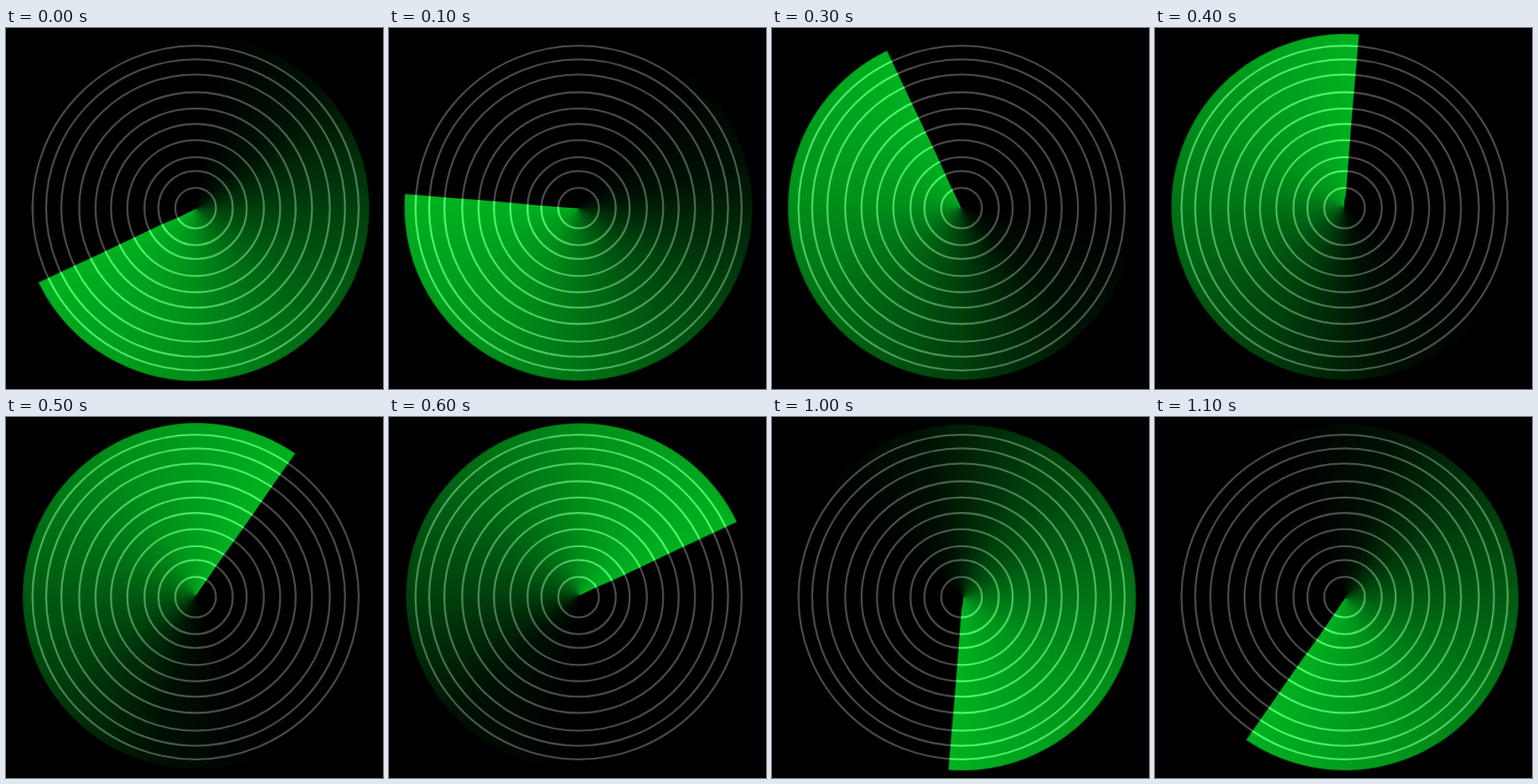
An HTML page that plays this animation: 450x430 px, repeating every 1200 ms.

```html
<!DOCTYPE html>
<html lang="en">
<head>
<meta charset="utf-8">
<title>Radar sweep</title>
<style>
  html, body {
    margin: 0;
    width: 100%;
    height: 100%;
    overflow: hidden;
    background: #000;
  }
  .stage {
    position: relative;
    width: 450px;
    height: 430px;
    overflow: hidden;
    background: #000;
    isolation: isolate;
  }
  /* The dish is slightly wider than tall. */
  .dish {
    position: absolute;
    left: 21.4px;
    top: 8.4px;
    width: 412px;
    height: 412px;
    transform: scale(1.007, 1);
  }
  /* The beam turns a little off its own centre. */
  .beam {
    width: 100%;
    height: 100%;
    border-radius: 50%;
    background: conic-gradient(from .25deg at calc(50% - 1px) 50%,
      #00b120, #000 .3deg, #000 120deg, #001003 160deg,
      #00400c 206deg, #00911a 300deg, #00b120);
    animation: sweep 1.2s steps(12) infinite;
  }
  @keyframes sweep {
    from { transform: rotate(244.4deg) translateY(-1px); }
    to { transform: rotate(604.4deg) translateY(-1px); }
  }
  /* Rings add their light to the beam. */
  svg {
    position: absolute;
    inset: 0;
    mix-blend-mode: plus-lighter;
  }
  circle {
    fill: none;
    stroke: #484848;
    stroke-width: 2.4;
  }
</style>
</head>
<body>
<div class="stage">
  <div class="dish"><div class="beam"></div></div>
  <svg width="450" height="430" viewBox="0 0 450 430">
    <g transform="translate(226.3 214.5) scale(1 .993)">
      <circle r="24.3"/>
      <circle r="44.4"/>
      <circle r="61"/>
      <circle r="81.5"/>
      <circle r="101"/>
      <circle r="119.5"/>
      <circle r="139"/>
      <circle r="160.3"/>
      <circle r="178.4"/>
      <circle r="194.7"/>
    </g>
  </svg>
</div>
</body>
</html>
```
